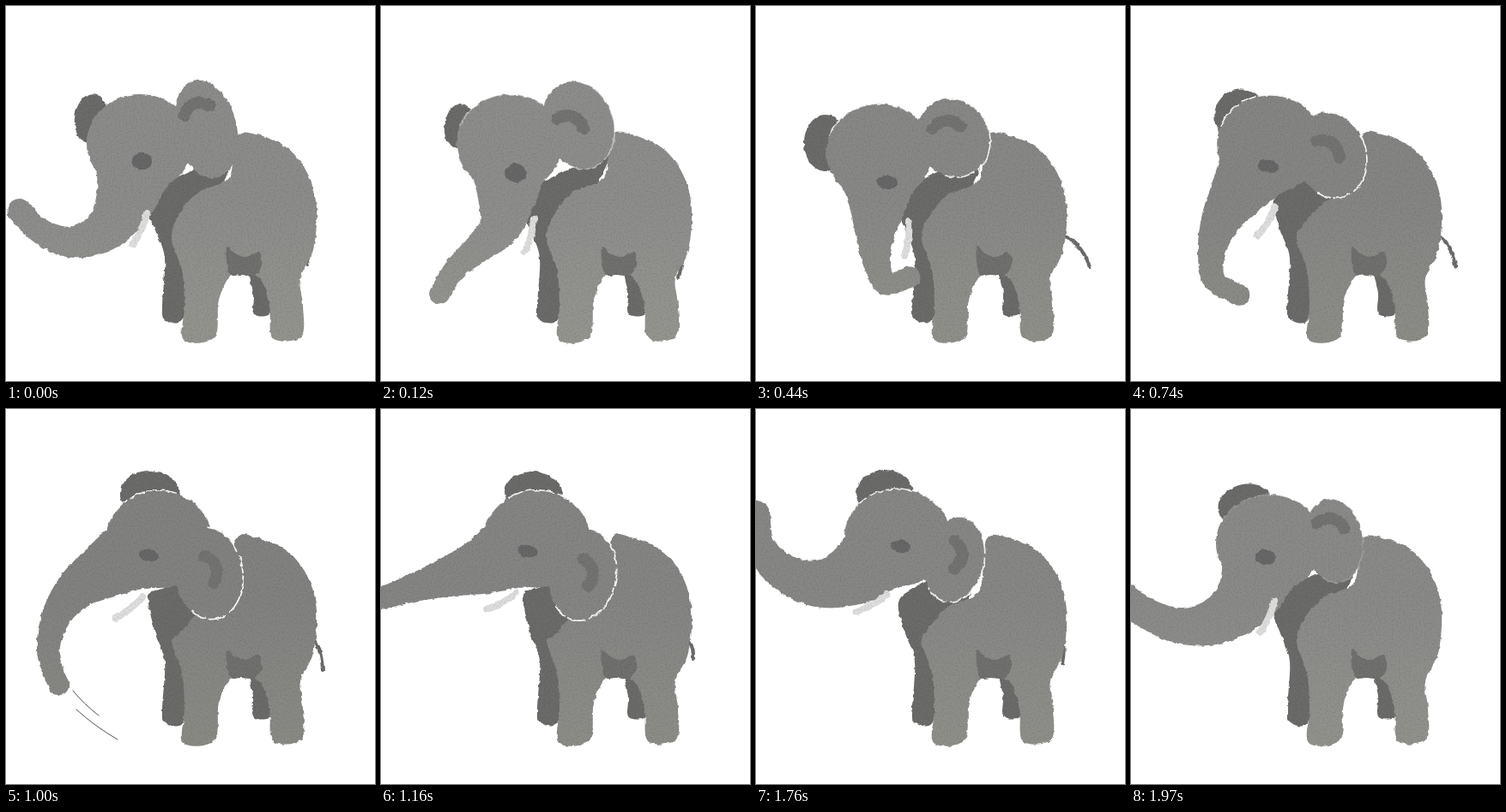
Animation, 430 px wide and 438 px high, one loop 2010 ms. Source, as an HTML page:

```html
<!DOCTYPE html>
<html lang="en">
<head>
<meta charset="utf-8">
<title>Elephant</title>
<style>
html, body { margin: 0; width: 100%; height: 100%; overflow: hidden; background: #fff; }
svg { display: block; width: 100vw; height: 100vh; }
path { stroke-linecap: round; stroke-linejoin: round; }
</style>
</head>
<body>
<svg viewBox="0 0 430 438">
  <defs>
    <linearGradient id="skin" gradientUnits="userSpaceOnUse" x1="0" y1="220" x2="0" y2="390">
      <stop offset="0"/><stop offset="1"/>
    </linearGradient>
    <filter id="paint" filterUnits="userSpaceOnUse" x="0" y="0" width="430" height="438" color-interpolation-filters="sRGB">
      <feTurbulence id="edge" type="fractalNoise" baseFrequency="0.14" numOctaves="2"/>
      <feColorMatrix values="1 0 0 0 0  0 1 0 0 0  0 0 1 0 0  0 0 0 0 1" result="wobble"/>
      <feDisplacementMap in="SourceGraphic" in2="wobble" scale="4" xChannelSelector="R" yChannelSelector="G" result="rough"/>
      <feTurbulence id="paper" type="fractalNoise" baseFrequency="0.5" numOctaves="2"/>
      <feColorMatrix values="0 0 0 0 0  0 0 0 0 0  0 0 0 0 0  .22 0 0 0 -.09"/>
      <feComposite in2="rough" operator="atop"/>
    </filter>
  </defs>
  <g id="art" filter="url(#paint)"></g>
  <path id="swish" d="M78 329Q90 344 108 358M82 351Q104 371 130 386" fill="none" stroke="#555" stroke-width="1"/>
</svg>
<script>
const LOOP = 2010;
const STEPS = [0, 40, 120, 200, 280, 360, 440, 610, 740, 870, 1000, 1080,
  1160, 1290, 1420, 1590, 1760, 1890, 1970];

// head: centre. bend: heading of each trunk segment, seg: their length, tip: end radius.
// ear, far: x, y, rx, ry, turn. patch: x, y, bulge heading. eye: x, y, ry. tusk: x, y, heading.
const POSES = [
  { t: 0, tone: 140, gap: 0, lean: 0, head: [156, 160], bend: [104, 122, 157, 197, 223], seg: 41, tip: 14,
    ear: [233, 144, 36, 58, -13], far: [99, 131, 19, 29, 8], patch: [221, 118, -110], eye: [158, 181, 10], tusk: [164, 242, 114], tail: [351, 302] },
  { t: 120, tone: 141, gap: .5, lean: 0, head: [150, 160], bend: [93, 103, 136, 137, 122], seg: 37, tip: 12,
    ear: [230, 139, 41, 52, -18], far: [91, 140, 17, 26, 8], patch: [222, 133, -70], eye: [157, 195, 11], tusk: [178, 248, 105], tail: [347, 317] },
  { t: 440, tone: 136, gap: .9, lean: .1, head: [144, 171], bend: [92, 95, 88, 70, -15], seg: 33, tip: 12,
    ear: [230, 154, 42, 47, -25], far: [81, 160, 25, 33, 0], patch: [222, 138, -93], eye: [153, 206, 8], tusk: [178, 252, 97], tail: [389, 304] },
  { t: 1000, tone: 130, gap: 1, lean: .8, head: [178, 152], bend: [150, 147, 125, 101, 72], seg: 43, tip: 12,
    ear: [236, 192, 40, 54, -8], far: [168, 100, 35, 28, 3], patch: [241, 186, -20], eye: [166, 171, 7], tusk: [159, 219, 141], tail: [369, 305] },
  { t: 1420, tone: 138, gap: .9, lean: 1, head: [187, 151], bend: [158, 185, 224, 261, 320], seg: 38, tip: 13,
    ear: [234, 197, 37, 53, 40], far: [194, 97, 32, 22, 12], patch: [246, 198, 10], eye: [178, 158, 7], tusk: [156, 207, 166], tail: [356, 272] },
  { t: 1760, tone: 135, gap: .9, lean: .5, head: [165, 150], bend: [140, 165, 199, 227, 262], seg: 42, tip: 17,
    ear: [231, 176, 35, 50, 12], far: [150, 99, 33, 28, 0], patch: [236, 170, 0], eye: [168, 160, 7], tusk: [152, 217, 151], tail: [357, 297] },
  { t: 1970, tone: 138, gap: .2, lean: .1, head: [161, 157], bend: [112, 142, 172, 200, 215], seg: 43, tip: 17,
    ear: [236, 154, 34, 49, -8], far: [133, 112, 32, 24, -15], patch: [233, 132, -80], eye: [157, 173, 9], tusk: [167, 224, 114], tail: [356, 272] }
];
POSES.push({ ...POSES[0], t: LOOP });

const pairs = s => s.split(' ').map(p => p.split(',').map(Number));
const BODY = pairs('268,153 292,150 328,166 352,197 362,236 358,285 343,318 346,350 344,386 311,388 307,350 297,320 280,313 263,313 248,343 243,387 207,390 208,350 205,308 193,272 202,242 225,217 260,200');
const CHEST = pairs('272,160 235,183 186,208 166,238 174,262 185,295 182,350 185,366 206,366 214,315 250,215');
const FAR_LEG = pairs('284,310 300,316 308,353 304,362 288,359 288,336');
const BELLY = pairs('257,282 267,289 280,293 294,287 298,302 290,314 275,314 260,312');

const mix = (a, b, u) => Array.isArray(a) ? a.map((v, i) => mix(v, b[i], u)) : a + (b - a) * u;

function poseAt(t) {
  const i = POSES.findIndex(p => p.t > t);
  const a = POSES[i - 1], b = POSES[i];
  const pose = {};
  for (const k in a) pose[k] = mix(a[k], b[k], (t - a.t) / (b.t - a.t));
  return pose;
}

const rad = deg => deg * Math.PI / 180;
const move = ([x, y], deg, len) => [x + len * Math.cos(rad(deg)), y + len * Math.sin(rad(deg))];

// Point at u between q and r on a Catmull-Rom curve
const spline = (p, q, r, s, u) => q.map((x, k) => x + u / 2 * (r[k] - p[k] +
  u * (2 * p[k] - 5 * x + 4 * r[k] - s[k] + u * (3 * x - p[k] - 3 * r[k] + s[k]))));

function curve(pts, closed = true) {
  const n = pts.length;
  const at = i => pts[closed ? (i + n) % n : Math.max(0, Math.min(n - 1, i))];
  const out = [at(0)];
  for (let i = 0; i < (closed ? n : n - 1); i++)
    for (let u = 1; u <= 8; u++) out.push(spline(at(i - 1), at(i), at(i + 1), at(i + 2), u / 8));
  return out;
}
const path = pts => 'M' + pts.map(p => p.map(v => v.toFixed(1))).join('L');

// Part of a turned ellipse as points
function ring([x, y, rx, ry, turn = 0], from = 0, to = 360) {
  const c = Math.cos(rad(turn)), s = Math.sin(rad(turn));
  const pts = [];
  for (let a = from; a <= to; a += 6) {
    const px = rx * Math.cos(rad(a)), py = ry * Math.sin(rad(a));
    pts.push([x + px * c - py * s, y + px * s + py * c]);
  }
  return pts;
}

// Tapering chain of discs along the bent trunk
function trunk({ head, bend, seg, tip }) {
  const joints = [move(head, bend[0], 20)];
  bend.forEach((deg, i) => joints.push(move(joints[i], deg, seg * (1.1 - .05 * i))));
  const spine = curve(joints, false);
  return spine.map((p, i) => {
    const r = tip + (48 - tip) * (1 - i / (spine.length - 1)) ** 2.2;
    return path(ring([...p, r, r]));
  }).join('');
}

function arc([x, y, deg]) {
  const mid = [x, y];
  return `M${move(mid, deg - 105, 17)}Q${move(mid, deg, 13)} ${move(mid, deg + 105, 17)}`;
}

const art = document.getElementById('art');
function layer(attrs) {
  const p = document.createElementNS('http://www.w3.org/2000/svg', 'path');
  for (const k in attrs) p.setAttribute(k, attrs[k]);
  return art.appendChild(p);
}
const fill = color => layer({ fill: color });
const line = (color, width, dash = 'none') =>
  layer({ fill: 'none', stroke: color, 'stroke-width': width, 'stroke-dasharray': dash });

const SKIN = 'url(#skin)', DARK = '#6b6b6a';
const parts = {
  far: fill(DARK), tail: line(DARK, 4), chest: fill(DARK), farLeg: fill(DARK),
  body: fill(SKIN), belly: fill('#70706e'), head: fill(SKIN), headGap: line('#fff', 1.5, '34 5 18 3'),
  ear: fill(SKIN), patch: line('#737372', 14), eye: fill('#676767'),
  earGap: line('#fff', 1.7, '46 6 20 4'), tusk: line('#dedede', 8)
};
const stops = document.querySelectorAll('stop');
const edge = document.getElementById('edge');
const paper = document.getElementById('paper');
const swish = document.getElementById('swish');

function draw(step) {
  const t = STEPS[step], p = poseAt(t);
  const skull = [...p.head, 62, 57];
  const [x, y, heading] = p.tusk;
  const shapes = {
    far: path(ring(p.far)),
    tail: `M354 266Q${(354 + p.tail[0]) / 2 + 6} 274 ${p.tail}`,
    chest: path(curve(CHEST.map(([x, y], i) => [x, i === 3 ? y - 24 * p.lean : y]))),
    farLeg: path(curve(FAR_LEG)),
    body: path(curve(BODY.map(([x, y], i) => [x, i > 19 ? y + 26 * p.lean : y]))),
    belly: path(curve(BELLY)),
    head: path(ring(skull)) + trunk(p),
    headGap: path(ring(skull, -160, -30)),
    ear: path(ring(p.ear)),
    patch: arc(p.patch),
    eye: path(ring([p.eye[0], p.eye[1], 12, p.eye[2], 8])),
    earGap: path(ring(p.ear, -80, 130)),
    tusk: `M${x} ${y}Q${move([x, y], heading - 12, 20)} ${move([x, y], heading, 40)}`
  };
  for (const name in shapes) parts[name].setAttribute('d', shapes[name]);
  parts.headGap.setAttribute('opacity', p.gap);
  parts.earGap.setAttribute('opacity', p.gap);
  const g = Math.round(p.tone);
  stops[0].setAttribute('stop-color', `rgb(${g},${g},${g - 1})`);
  stops[1].setAttribute('stop-color', `rgb(${g + 8},${g + 8},${g + 3})`);
  edge.setAttribute('seed', step + 1);
  paper.setAttribute('seed', step + 40);
  swish.setAttribute('visibility', t === 1000 ? 'visible' : 'hidden');
}

let shown = -1;
function tick() {
  const t = performance.now() % LOOP;
  const step = STEPS.filter(s => s <= t).length - 1;
  if (step !== shown) draw(shown = step);
  requestAnimationFrame(tick);
}
tick();
</script>
</body>
</html>
```
